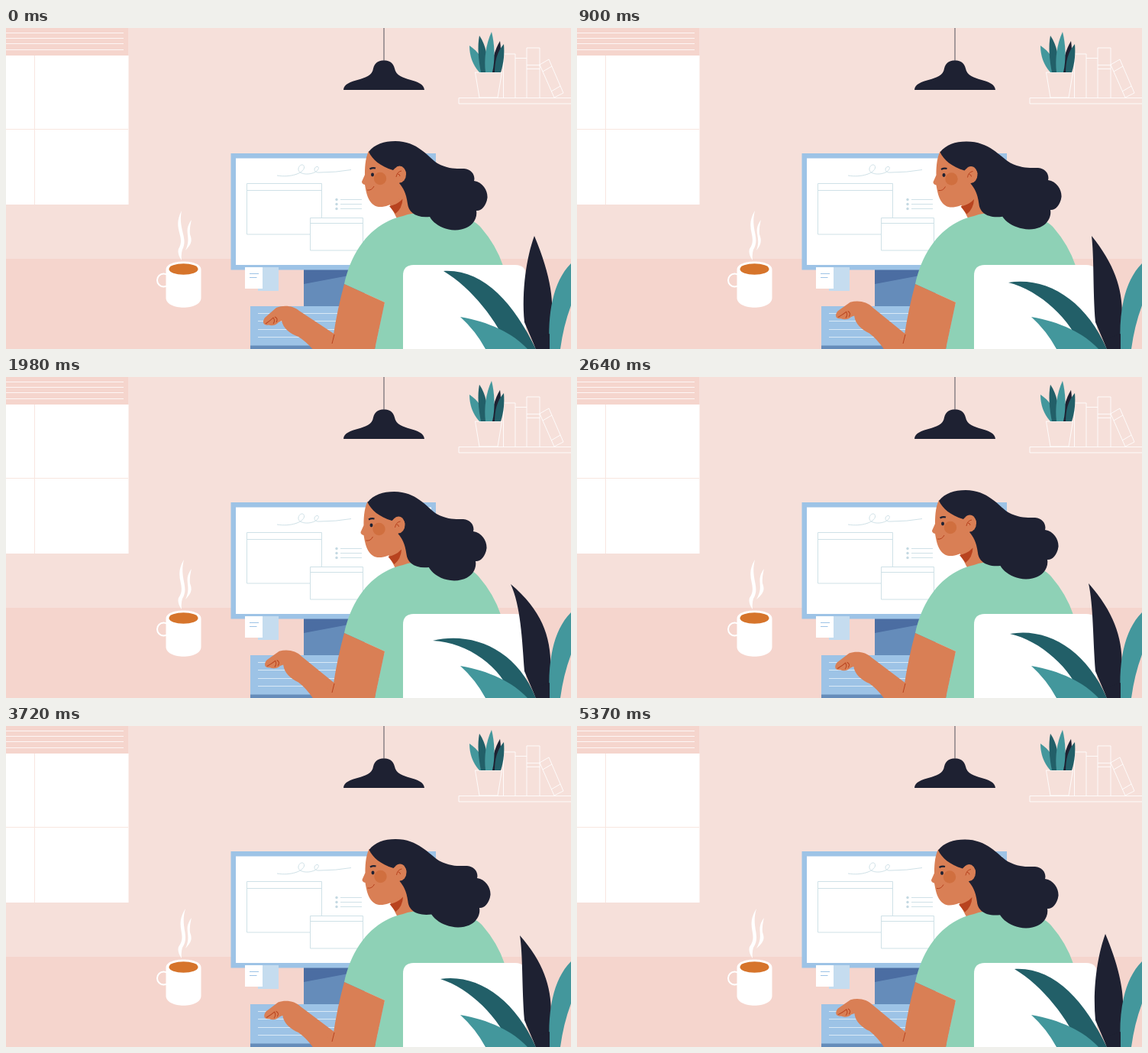
Write an HTML page that moves like this. It is 740x420 px and loops after 5.4 s.

```html
<!DOCTYPE html>
<html lang="en">
<head>
<meta charset="utf-8">
<title>Working at a desk</title>
<style>
  html, body { margin: 0; width: 100%; height: 100%; overflow: hidden; background: #f6e0da; }
  svg { display: block; width: 740px; height: 420px; }
  .line { fill: none; stroke-width: 1; }
  .ink { fill: #1e2132; }
  .skin { fill: #d97f55; }
  .deep { fill: #225f68; }
  .teal { fill: #43979c; }
  .blue { fill: #9dc3e6; }
</style>
</head>
<body>
<svg viewBox="0 0 740 420">
  <path fill="#f5d5cd" d="M0 302H740V420H0z"/>

  <!-- wall calendar -->
  <path fill="#f5d5cd" d="M0 0H160V36H0z"/>
  <path fill="#fff" d="M0 36H160.500V231H0z"/>
  <path class="line" stroke="#fff" d="M0 6.500H154M0 13.500H154M0 20.500H154M0 28.500H154" opacity=".8"/>
  <path class="line" stroke="#f8e6e0" d="M37.500 36V231M0 132.500H160"/>

  <!-- lamp -->
  <path class="line" stroke="#55525c" d="M495 0V44"/>
  <path class="ink" d="M442 81C443 65 479 71 481 53C483 45 488 42.500 495 42.500S507 45 509 53C512 71 547 65 548 81z"/>

  <!-- shelf -->
  <path class="line" stroke="#fff" opacity=".85" d="M740 91.500H593V99H740M614.500 58H649.500L644 91H620zM651.500 91V34H667V91M667 39.500H682M682 91V26H699V91M682 48.500H699M682 53.500H699M699 48L711 41L730 85L718 91zM703 57L715 50M714 83L726 76"/>
  <path class="teal" d="M607 23C607 36 611 48 620 58H628C626 42 619 31 607 23z"/>
  <path class="deep" d="M620 10C617 25 619 43 622 58H630C632 40 629 23 620 10z"/>
  <path class="ink" d="M647 17C640 29 636 43 636 58H642C648 44 649 30 647 17z"/>
  <path class="deep" d="M652 21C643 31 640 44 640 58H648C652 46 653 33 652 21z"/>
  <path class="teal" d="M636 5C628 22 626 42 628 58H637C641 41 640 21 636 5z"/>

  <!-- monitor -->
  <path fill="#658cba" d="M390 316H470V364H390z"/>
  <path fill="#4b6da2" d="M390 316H470V320L390 335z"/>
  <path class="blue" d="M294.500 164H563V316.500H294.500z"/>
  <path fill="#fff" d="M301 170.500H557V310H301z"/>
  <g class="line" stroke="#cfe1e7">
    <path d="M355 193C373 196 389 190 390.500 183C391 177 384 178 383 184C382 191 395 193 404 189C410 186 411 181 407 181.500C403 182 402 190 411 189Q432 189 452 185.500"/>
    <path d="M315.500 203.500H413.500V270H315.500zM315.500 212.500H413.500M438 224.500H466M438 230.500H466M438 236.500H466"/>
    <path fill="#fff" d="M398.500 248.500H467.500V291H398.500zM398.500 255.500H467.500"/>
  </g>
  <g fill="#c4d9e2">
    <circle cx="433" cy="224.500" r="1.700"/><circle cx="433" cy="230.500" r="1.700"/><circle cx="433" cy="236.500" r="1.700"/>
  </g>
  <path fill="#c5dcef" d="M330 313H357V344H330z"/>
  <path fill="#fff" d="M313 313H336V341H313z"/>
  <path class="line" stroke="#9dc3e6" d="M319 321.500H331M319 326.500H328.500"/>

  <!-- keyboard -->
  <path class="blue" d="M320 364H500V416H320z"/>
  <path fill="#658cba" d="M320 415.500H500V420H320z"/>
  <path class="line" stroke="#d9e9f6" d="M330 373.500H490M330 383.500H490M330 394.500H490M330 404.500H490"/>

  <!-- cup -->
  <circle cx="206.500" cy="330" r="8.500" fill="none" stroke="#fff" stroke-width="2"/>
  <path fill="#fff" d="M209.500 316C209.500 302 255.500 302 255.500 316V353C255.500 370 209.500 370 209.500 353z"/>
  <ellipse cx="232.500" cy="315.500" rx="19" ry="7.300" fill="#d6742b"/>
  <path id="steam" fill="#fff"/>

  <!-- woman -->
  <g id="neck">
    <path class="skin" d="M500 226L515 255L545 250L530 205z"/>
    <path fill="#b8431f" d="M502 233Q513 231 519.500 223.500Q519 236 510 243z"/>
  </g>
  <path id="shirt" fill="#8ed1b6"/>
  <g id="hand">
    <path class="skin" d="M434 403L384 370C376 363 364 362 354 366L339 379C335 385 337 390 344 388.500C348 390 354 389 357 385L361 383C363 393 372 400 383 404Q396 412 408 428H440z"/>
    <path class="line" stroke="#b8431f" d="M340 387Q346 383 350 379Q353 383 350 387M352 378Q357 380 354 385"/>
  </g>
  <path class="skin" d="M443 335L496 359L483 420H404L429 401Q434 368 443 335z"/>
  <path class="line" stroke="#b8431f" d="M430 401L427 413"/>
  <g id="head">
    <path class="skin" d="M475 161C470 171 470 186 470 192L466 201Q466 204 470 205C472 217 475 232 488 234C503 235 515 224 522 217L530 180z"/>
    <circle cx="490" cy="197" r="8.200" fill="#d06f3f"/>
    <path id="hair" class="ink"/>
    <ellipse class="skin" cx="515.500" cy="191.500" rx="8.500" ry="11"/>
    <path class="line" stroke="#b8431f" d="M511 195Q512 188 518 187M513 191Q516 191 516 194M473 212Q479 213 482 207"/>
    <path fill="none" stroke="#1e2132" stroke-width="2.200" d="M476.500 184.500Q480 182.500 484 183.500"/>
    <ellipse class="ink" cx="480" cy="192" rx="2" ry="2.400"/>
  </g>

  <!-- chair and plant -->
  <path fill="#fff" d="M520 420V324Q520 310 534 310H667Q681 310 681 324V420z"/>
  <path id="darkLeaf" class="ink"/>
  <path id="longLeaf" class="deep"/>
  <path class="teal" d="M595 378C632 384 665 400 683 420H628Q615 396 595 378z"/>
  <path class="teal" d="M740 308C716 332 709 375 712 420H726Q730 390 740 363z"/>
  <path class="ink" d="M694 420L690 408L712 400V420z"/>
</svg>
<script>
const LOOP = 5400, TAP = 360;
const TIMES = [0, 900, 1980, 2640, 3720, 4470, 5370];
const el = id => document.getElementById(id);
const draw = (id, d) => el(id).setAttribute('d', d);
const pose = (id, value) => el(id).setAttribute('transform', value);

// Smooth curve through one value per entry of TIMES.
function track(...v) {
  const last = v.length - 1;
  const slope = i => i === 0 || i === last ? 0 : (v[i + 1] - v[i - 1]) / (TIMES[i + 1] - TIMES[i - 1]);
  return t => {
    if (t >= TIMES[last]) return v[last];
    const i = TIMES.findIndex(x => x > t) - 1, span = TIMES[i + 1] - TIMES[i];
    const u = (t - TIMES[i]) / span, s = u * u * (3 - 2 * u);
    return v[i] + (v[i + 1] - v[i]) * s
      + span * u * (1 - u) * (slope(i) * (1 - u) - slope(i + 1) * u);
  };
}

const headX = track(0, .5, -1.5, -1, .5, -.5, -2);
const headY = track(0, .5, 2, 0, 0, 2, .5);
const bunX = track(0, 4, -1, 0, 4, 0, 0);
const bunY = track(0, -1, 2, 0, -1, 2.5, 0);
const backX = track(0, 2, -3, -1, 2, -2, -1);
const darkX = track(692, 674, 661, 670, 673, 670, 692);
const darkY = track(272, 272, 271, 270, 274, 276, 272);
const longX = track(573, 565, 559, 567, 569, 566, 573);
const longY = track(318, 333, 345, 336, 331, 332, 318);
const steamL = track(230, 233, 233, 233, 235, 231, 235);
const steamR = track(242, 240, 242, 244, 242, 242, 244);

function steam(l, r) {
  const s = (l - 230) / 2;
  draw('steam', `M${l} 239C${217 + s} 264 ${236 + s} 272 226 289Q224 296 230 304Q229 296 231 290
    C${239 + s} 274 ${225 + s} 264 ${l} 239zM${r + 1} 251C${r - 11} 267 ${r + 2} 272 235 291
    C${r + 3} 281 ${r + 1} 276 ${r - 1} 270Q${r - 2} 262 ${r + 1} 251z`);
}

function leaves(dx, dy, lx, ly) {
  const a = (692 - dx) / 31, b = (ly - 318) / 27;
  draw('darkLeaf', `M${dx} ${dy}C${682 - 8 * a} 299 ${675 + a} 343 679 385L694 420H712L713 395
    C${719 - 3 * a} ${360 - 14 * a} ${714 - 8 * a} ${325 - 16 * a} ${dx} ${dy}z`);
  draw('longLeaf', `M${lx} ${ly}C${625 - 15 * b} ${315 + 18 * b} ${665 + 3 * b} ${360 - 5 * b} 694 420
    H${658 + 5 * b}C${645 + 5 * b} ${385 - 5 * b} ${610 - 5 * b} ${340 + 7 * b} ${lx} ${ly}z`);
}

function woman(t) {
  const x = headX(t), y = headY(t), bx = bunX(t) - x, by = bunY(t) - y, back = backX(t);
  const p = (px, py, k = 1) => `${px + bx * k} ${py + by * k} `;
  const move = `translate(${x} ${y})`;
  pose('neck', move);
  pose('head', move);
  draw('hair', `M475 162C483 152 495 148 510 148C539 148 ${p(552, 168, .4)}${p(565, 177, .6)}
    C${p(580, 185, .8)}${p(590, 184)}${p(600, 184)}C${p(610, 185)}${p(615, 193)}${p(613, 200)}
    C${p(625, 202)}${p(631, 213)}${p(630.5, 222)}C${p(629, 234)}${p(621, 240)}${p(616, 239)}
    C${p(618, 250)}${p(610, 264)}${p(588, 264.5)}C${p(572, 264)}${p(560, 256, .7)}${p(555, 247, .5)}
    C536 249 527 240 526 230C524 215 520 209 515 203L524 190C523 182 514 178 507 186C490 181 480 172 475 162z`);
  draw('shirt', `M443 335C453 290 479 255 520 246Q535 240 560 242C596 244 ${612 + back} 250 ${622 + back} 261
    Q${642 + back} 284 ${651 + back} 311V420H483L496 359z`);

  // The hand rises gently, then strikes the key.
  const q = t % TAP / TAP, u = Math.min(1, q / .6);
  const lift = q > .92 ? (1 - q) / .08 : u * u * (3 - 2 * u);
  pose('hand', `rotate(${6 * lift} 430 402)`);
}

function frame(now) {
  const t = now % LOOP;
  steam(steamL(t), steamR(t));
  leaves(darkX(t), darkY(t), longX(t), longY(t));
  woman(t);
  requestAnimationFrame(frame);
}
frame(0);
</script>
</body>
</html>
```
